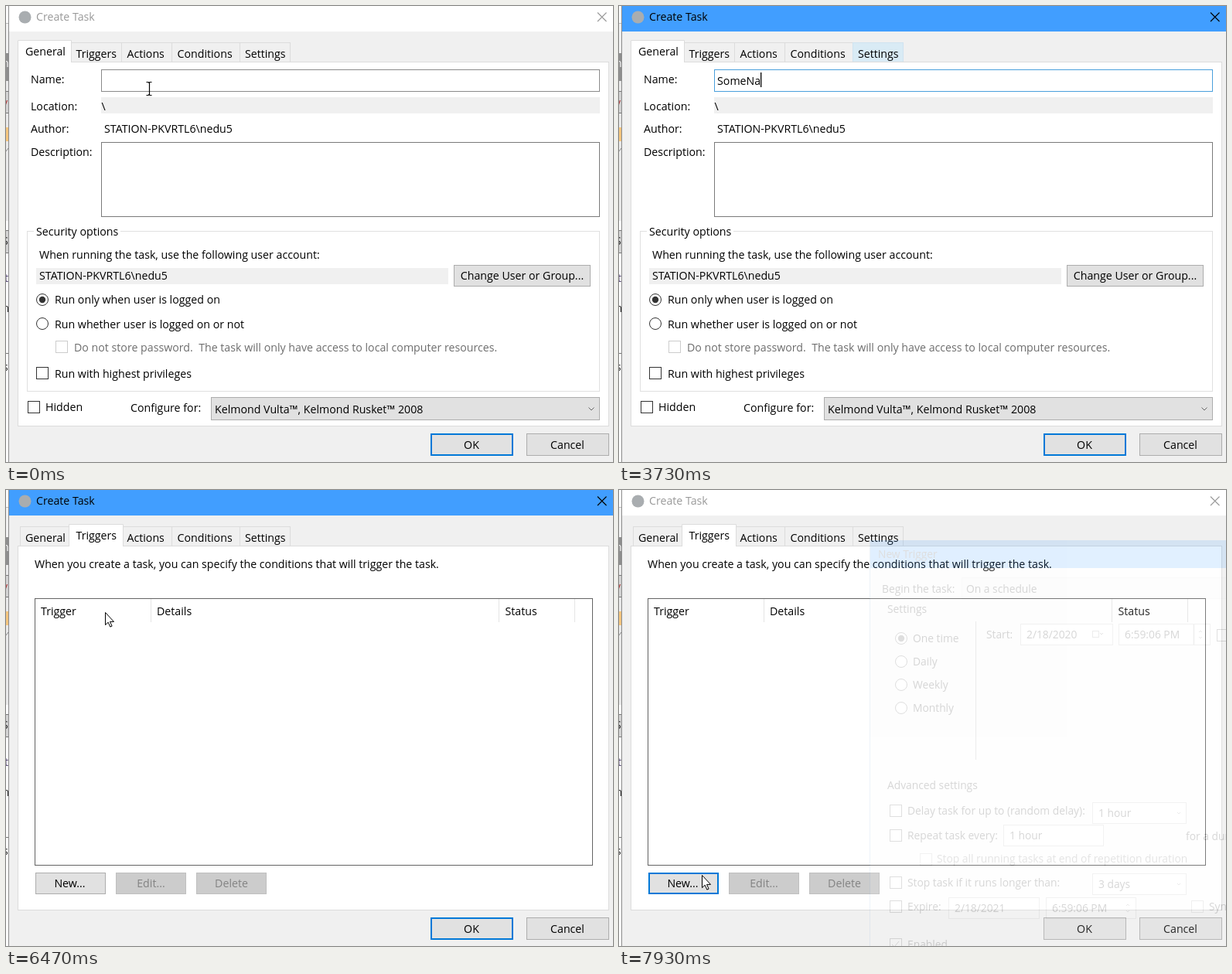
Write an HTML page that moves like this. It is 785 by 590 pixels and loops after 8000 ms.

```html
<!DOCTYPE html>
<html lang="en">
<head>
<meta charset="utf-8">
<title>Create Task</title>
<style>
  html, body { margin: 0; width: 100%; height: 100%; overflow: hidden; background: #f0f0f0; }
  svg { display: block; width: 785px; height: 590px; }
  text { font: 14.2px "Open Sans", "Noto Sans", sans-serif; white-space: pre; }
  .mid { text-anchor: middle; }
  .small text { font-size: 13.8px; }
</style>
</head>
<body>
<svg id="stage" viewBox="0 0 785 590"></svg>
<script>
const LOOP = 8000, TICK = 200 / 3;
const ACCENT = '#0078d7', FACE = '#e1e1e1', EDGE = '#adadad', SOFT = '#dcdcdc', DARK = '#333';
const ACCOUNT = 'STATION-PKVRTL6\\nedu5';

// Drawing helpers; boxes take their left, top, right and bottom pixel.
const text = (x, y, s, fill = '#000', cls = '') =>
  `<text x="${x}" y="${y}" fill="${fill}" class="${cls}">${s}</text>`;
const fill = (x, y, w, h, color) => `<rect x="${x}" y="${y}" width="${w}" height="${h}" fill="${color}"/>`;
const box = (l, t, r, b, stroke, inside = 'none', id = '') =>
  `<rect id="${id}" x="${l + .5}" y="${t + .5}" width="${r - l}" height="${b - t}" fill="${inside}" stroke="${stroke}"/>`;
const line = (d, stroke = SOFT, width = 1) => `<path d="${d}" fill="none" stroke="${stroke}" stroke-width="${width}"/>`;
const ring = (l, t, r, b, id) =>
  `<rect id="${id}" x="${l + 1}" y="${t + 1}" width="${r - l - 1}" height="${b - t - 1}" fill="${FACE}" stroke="${ACCENT}" stroke-width="2"/>`;
const label = (l, r, y, s, color) => text((l + r + 1) / 2, y, s, color, 'mid');
const button = (l, t, r, b, s, off) =>
  box(l, t, r, b, off ? '#bfbfbf' : EDGE, off ? '#ccc' : FACE) + label(l, r, t + 19, s, off ? '#838383' : '#000');
const check = (x, y, stroke = DARK, size = 15) => box(x, y, x + size, y + size, stroke, '#fff');
const radio = (x, y, on) =>
  `<circle cx="${x}" cy="${y}" r="7.5" fill="#fff" stroke="${DARK}"/>` +
  (on ? `<circle cx="${x}" cy="${y}" r="4.2" fill="${DARK}"/>` : '');
const group = (id, ...parts) => `<g id="${id}">${parts.join('')}</g>`;

const tabs = [['General', 18, 84, 25], ['Triggers', 84, 149, 90.5], ['Actions', 149, 214, 156.5],
  ['Conditions', 214, 302, 221.5], ['Settings', 302, 367, 309]];
const hotTab = (i, id) => box(tabs[i][1], 47, tabs[i][2], 72, '#cfe3f0', '#d9ebf5', id);
const openTab = (i, l, r) =>
  `<path d="M${l + .5} 73V44.5H${r + .5}V73" fill="#fff" stroke="${SOFT}"/>` + text(tabs[i][3], 64, tabs[i][0]);

const titleBar = (color, ink) =>
  fill(4, 0, 781, 33, color) +
  '<circle cx="24.5" cy="14.5" r="8" fill="#a9adb0"/>' +
  `<g style="--a:0">${text(39, 19, 'Create Task', ink)}</g>` +
  line('M765 8.5l11.5 11.5M776.5 8.5L765 20', ink, 1.1);

// Sliver of the window behind the dialog.
const behind = [
  fill(0, 0, 3, 590, '#fff'), fill(0, 23, 3, 38, '#f0f0f0'), fill(0, 22, 3, 1, '#bbb'),
  fill(0, 61, 3, 36, '#8e8e8e'), fill(0, 97, 3, 181, '#e8e8e8'),
  fill(0, 110, 3, 29, '#d2d2d2'), line('M0 110.5H3M0 138.5H3M0 290.5H3M0 319.5H3M0 449.5H3', '#777'),
  fill(0, 157, 3, 18, '#f3c57e'), line('M0 188l3-4', '#888'),
  fill(0, 291, 3, 28, '#d2d2d2'),
  text(-5, 79, 'n', '#fff'), text(-5, 130, 'v', '#a33'), text(-5, 309, 'S', '#222'),
  text(-2, 357, 't', '#436'), text(-9, 396, 'm', '#222'), text(-4, 472, 's', '#222'),
  fill(3, 0, 1, 590, '#8b8b8b')
].join('');

const keys = [[2530, 'S'], [2670, 'o'], [2800, 'm'], [2930, 'e'], [3670, 'N'], [3730, 'a'],
  [3870, 'm'], [3930, 'e'], [4200, 'H'], [4270, 'E'], [4330, 'r'], [4470, 'e']];

const general = group('general',
  openTab(0, 15, 84),
  text(32, 100, 'Name:'), text(32, 135, 'Location:'), text(32, 164, 'Author:'), text(32, 194, 'Description:'),
  box(123, 82, 767, 110, '#8a8a8a', '#fff'), box(123, 82, 767, 110, '#4a9fdc', '#fff', 'focus'),
  `<text id="typed" x="127" y="102">${keys.map(k => `<tspan>${k[1]}</tspan>`).join('')}</text>`,
  `<rect id="caret" y="86" width="1.3" height="19"/>`,
  fill(123, 118, 645, 21, '#f0f0f0'), text(123.5, 135, '\\'), text(127, 164, ACCOUNT),
  box(123, 176, 767, 272, '#7a7a7a', '#fff'),
  box(27, 291, 767, 498, '#e0e0e0'), fill(36, 288, 112, 8, '#fff'), text(39, 297, 'Security options'),
  text(43, 327, 'When running the task, use the following user account:'),
  fill(39, 339, 533, 21, '#f0f0f0'), text(43, 354, ACCOUNT),
  button(579, 335, 755, 362, 'Change User or Group...'),
  radio(47, 380, true), text(63, 385, 'Run only when user is logged on'),
  radio(47, 411), text(63, 417, 'Run whether user is logged on or not'),
  check(64, 433, '#ccc'),
  text(88, 447, 'Do not store password.  The task will only have access to local computer resources.', '#6d6d6d'),
  check(39, 467), text(63, 481, 'Run with highest privileges'),
  check(28, 511), text(51, 524, 'Hidden'), text(161, 525, 'Configure for:'),
  box(265, 506, 767, 535, EDGE, FACE), text(270, 527, 'Kelmond Vulta™, Kelmond Rusket™ 2008'),
  line('M753.5 519.5l3.5 3.5 3.5-3.5', '#666'));

const triggers = group('triggers',
  openTab(1, 81, 151),
  text(37, 101, 'When you create a task, you can specify the conditions that will trigger the task.'),
  box(37, 140, 758, 485, '#646464', '#fff'),
  line('M187.5 141V171M637.5 141V171M735.5 141V171', '#e5e5e5'),
  text(45, 162, 'Trigger'), text(195, 162, 'Details'), text(645.5, 162, 'Status'),
  box(38, 495, 128, 522, EDGE, FACE), box(38, 495, 128, 522, ACCENT, '#e5f1fb', 'hot'),
  box(38, 495, 128, 522, '#005499', '#cce4f7', 'pressed'), ring(38, 495, 128, 522, 'newRing'),
  label(38, 126, 514, 'New...'),
  button(142, 495, 232, 522, 'Edit...', true), button(246, 495, 336, 522, 'Delete', true));

const field = (l, t, r, b, s) => box(l, t, r, b, '#aaa', '#fff') + text(l + 8, t + 19, s);
const option = (y, s) => check(350, y) + text(373, y + 13, s);
const popup = `<g id="popup" class="small">` + [
  box(324, 65, 820, 620, '#8ab4d8', '#f4f4f4'), fill(325, 65, 460, 36, '#419eff'), text(335, 88, 'New Trigger', '#333'),
  text(340, 133, 'Begin the task:'), box(443, 113, 820, 140, '#ddd', '#eee'), text(449, 133, 'On a schedule'),
  text(347, 159, 'Settings'),
  ...['One time', 'Daily', 'Weekly', 'Monthly'].map((s, i) => radio(365, 192 + 30 * i, !i) + text(380, 197 + 30 * i, s)),
  line('M461.5 170V349', '#888'), text(475, 192, 'Start:'),
  field(519, 173, 638, 200, '2/18/2020'), box(612, 182, 620, 190, '#888'), line('M622 185l2 2 2-2', '#555'),
  field(646, 173, 764, 200, '6:59:06 PM'), line('M743.5 174V200M750 184l2-2 2 2M750 190l2 2 2-2', '#777'), check(773, 180),
  text(347, 387, 'Advanced settings'),
  option(407, 'Delay task for up to (random delay):'), field(612, 404, 733, 431, '1 hour'), line('M722 417l2 2 2-2', '#777'),
  option(439, 'Repeat task every:'), field(497, 433, 626, 460, '1 hour'), text(733, 453, 'for a duration of:'),
  check(389, 470, '#aaa'), text(411, 482, 'Stop all running tasks at end of repetition duration', '#555'),
  option(500, 'Stop task if it runs longer than:'), field(612, 496, 733, 523, '3 days'), line('M722 509l2 2 2-2', '#777'),
  option(531, 'Expire:'), field(426, 527, 543, 554, '2/18/2021'), field(552, 527, 668, 554, '6:59:06 PM'),
  line('M656 538l2-2 2 2M656 544l2 2 2-2', '#777'),
  check(740, 531, '#999'), text(763, 544, 'Synchronize'),
  option(580, 'Enabled'), line('M353 588l3 3 6-7', DARK)
].join('') + '</g>';

const cursor = group('cursor',
  '<path id="arrow" d="M.5.5V16.6L4.2 13.2l2.6 5.9 2.3-1-2.6-5.7h5z" fill="#fff" stroke="#000"/>',
  '<path id="ibeam" d="M-3.5-8.5h2.5l1 1 1-1h2.5M-3.5 8.5h2.5l1-1 1 1h2.5M.5-7.5V7.5" fill="none" stroke="#000" stroke-width="1.2"/>');

document.getElementById('stage').innerHTML = [
  fill(0, 0, 785, 590, '#f0f0f0'), behind,
  titleBar('#fff', '#999'), group('active', titleBar('#419eff', '#000')),
  ...tabs.map(([, l, r]) => box(l, 47, r, 72, SOFT, '#f0f0f0')),
  hotTab(1, 'hotTriggers'), hotTab(4, 'hotSettings'),
  ...tabs.map(([name, , , x]) => text(x, 67, name)),
  box(15, 72, 779, 543, SOFT, '#fff'),
  general, triggers,
  box(549, 553, 655, 581, EDGE, FACE), ring(549, 553, 655, 581, 'okRing'), label(549, 654, 573, 'OK'),
  box(673, 553, 779, 581, EDGE, FACE), label(673, 778, 573, 'Cancel'),
  popup, cursor
].join('');

const $ = id => document.getElementById(id);
const play = (el, frames) => el.animate(frames, { duration: LOOP, iterations: Infinity });

// Holds each value until the next time in the table.
const track = (el, prop, steps) => play(el, [...steps, [LOOP, steps.at(-1)[1]]]
  .map(([t, v]) => ({ offset: t / LOOP, [prop]: v, easing: 'step-end' })));

// Turns an element on and off at alternating times.
const show = (el, ...times) => track(el, 'opacity', [[0, 0], ...times.map((t, i) => [t, 1 - i % 2])]);

show($('active'), 400, 7870);
show($('focus'), 400);
show($('general'), 0, 5530);
show($('triggers'), 5530);
show($('okRing'), 0, 7470);
show($('pressed'), 7470, 7530);
show($('newRing'), 7870);
show($('caret'), 400, 930, 1400, 1870, 2470, 3470, 3670, 5000);
show($('ibeam'), 0, 1064);
show($('arrow'), 1064, 2530, 4997);
track($('hotSettings'), 'opacity', [[0, 0], [1330, .5], [1400, 1], [5000, .5], [5070, 0]]);
track($('hotTriggers'), 'opacity', [[0, 0], [5270, .5], [5330, 1], [5530, 0]]);
track($('hot'), 'opacity', [[0, 0], [7200, .4], [7270, .8], [7330, 1], [7870, 0]]);
track($('popup'), 'opacity', [[0, 0], [7870, .04], [7930, .16]]);

const typed = $('typed');
keys.forEach(([t], i) => show(typed.children[i], t));
track($('caret'), 'transform', [[0, 'translate(126px, 0px)'],
  ...keys.map(([t], i) => [t, `translate(${Math.round(127 + typed.getSubStringLength(0, i + 1))}px, 0px)`])]);

// Pointer path: time, x, y; it moves once per tick.
const path = [[0, 185, 107], [130, 193, 97], [800, 193, 97], [1130, 262, 75], [1330, 305, 58], [1400, 308, 56],
  [2330, 308, 56], [2400, 302, 53], [4930, 302, 53], [5130, 240, 73], [5330, 121, 62], [6000, 121, 62],
  [6270, 126, 90], [6470, 128, 158], [6670, 123, 330], [6870, 116, 479], [6930, 114, 484], [7000, 114, 484],
  [7330, 107, 498], [LOOP, 107, 498]];
play($('cursor'), path.map(([t, x, y], i) => ({
  offset: t / LOOP,
  transform: `translate(${x}px, ${y}px)`,
  easing: `steps(${Math.max(1, Math.round(((path[i + 1] || [t])[0] - t) / TICK))}, end)`
})));
</script>
</body>
</html>
```
